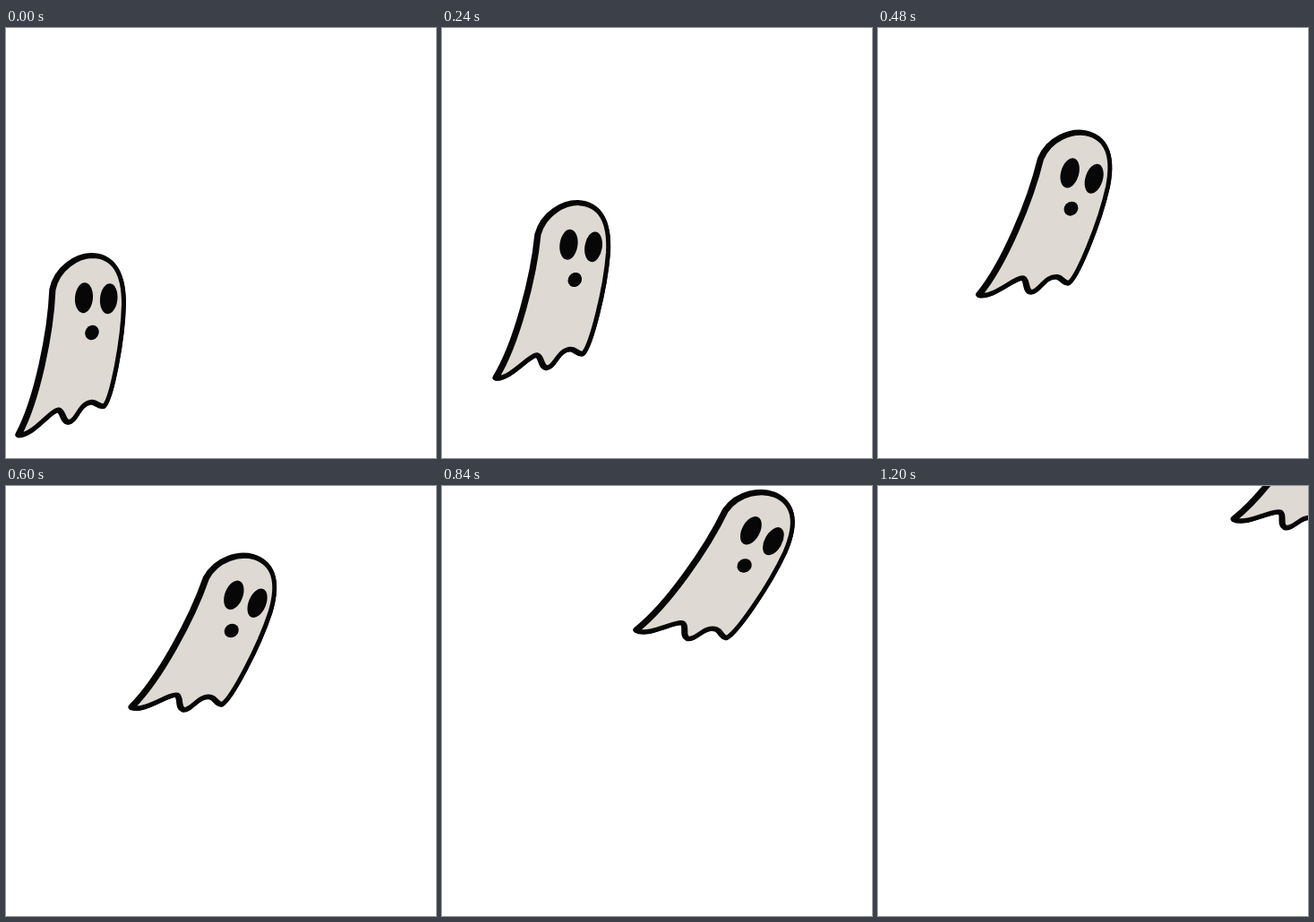
Write an HTML page with a canvas that moves like this. It is 480 px wide and 480 px high and loops after 1320 ms.

```html
<!DOCTYPE html>
<html lang="en">
<head>
<meta charset="utf-8">
<title>Flying ghost</title>
<style>
html, body { margin: 0; width: 100%; height: 100%; overflow: hidden; background: #fff; }
canvas { display: block; width: 480px; height: 480px; }
</style>
</head>
<body>
<canvas id="stage" width="480" height="480"></canvas>
<script>
const ctx = document.getElementById('stage').getContext('2d');
const STEP = 120;
const STEPS = 11;
const INK = '#060706';
const SHEET = '#dedad3';
const MAX_LEAN = 23.5 * Math.PI / 180;

// Flight path of the mouth: [step, x, y]
const flight = [
  [0, 96, 340], [2, 148.3, 281], [4, 215.5, 201.7], [5, 251.7, 161.5],
  [6, 299, 127], [8, 382, 49.3], [10, 518, -35]
];

// Upright ghost: crown, left side, ragged hem, right side
const body = new Path2D(`
  M96 254.5 C80 255 58 268 53 292 C51 340 36 415 15 454
  C30 455 50 426 59 426 C65 427 64 439 70.5 439.5
  C79 439 82 418 96 417.3 C102 417 104 423 110 421.5
  C118 412 130.5 350 131.5 308 C131.5 268 116 254.5 96 254.5 Z`);

// Cubic through the key points, with slopes taken from their neighbours
function along(step, axis) {
  const last = flight.length - 1;
  const i = Math.min(flight.findLastIndex(p => p[0] <= step), last - 1);
  const slope = j => {
    const a = flight[Math.max(j - 1, 0)];
    const b = flight[Math.min(j + 1, last)];
    return (b[axis] - a[axis]) / (b[0] - a[0]);
  };
  const a = flight[i], b = flight[i + 1];
  const span = b[0] - a[0];
  const u = (step - a[0]) / span, v = 1 - u;
  return v * v * (1 + 2 * u) * a[axis] + u * u * (1 + 2 * v) * b[axis]
    + u * v * span * (v * slope(i) - u * slope(i + 1));
}

function oval(x, y, rx, ry, tilt) {
  ctx.beginPath();
  ctx.ellipse(x, y, rx, ry, tilt, 0, Math.PI * 2);
  ctx.fill();
}

function outline(width, shift) {
  ctx.save();
  ctx.translate(shift, 0);
  ctx.lineWidth = width;
  ctx.stroke(body);
  ctx.restore();
}

function drawGhost(step) {
  ctx.save();
  ctx.translate(along(step, 1), along(step, 2));
  ctx.rotate(MAX_LEAN * Math.min(step / 6, 1) ** 1.83);
  ctx.translate(-96, -340);
  ctx.strokeStyle = INK;
  ctx.lineJoin = 'round';
  outline(7, -1.2); // heavier ink on the left
  ctx.fillStyle = SHEET;
  ctx.fill(body);
  outline(5, 0);
  ctx.fillStyle = INK;
  oval(87, 301.2, 10, 17, 0.08);
  oval(114.7, 302.2, 9.7, 17, 0.1);
  oval(96, 340, 7.5, 8.4, 0.6);
  ctx.restore();
}

function tick(now) {
  ctx.clearRect(0, 0, 480, 480);
  drawGhost(Math.floor(now / STEP) % STEPS);
  requestAnimationFrame(tick);
}

tick(0);
</script>
</body>
</html>
```
